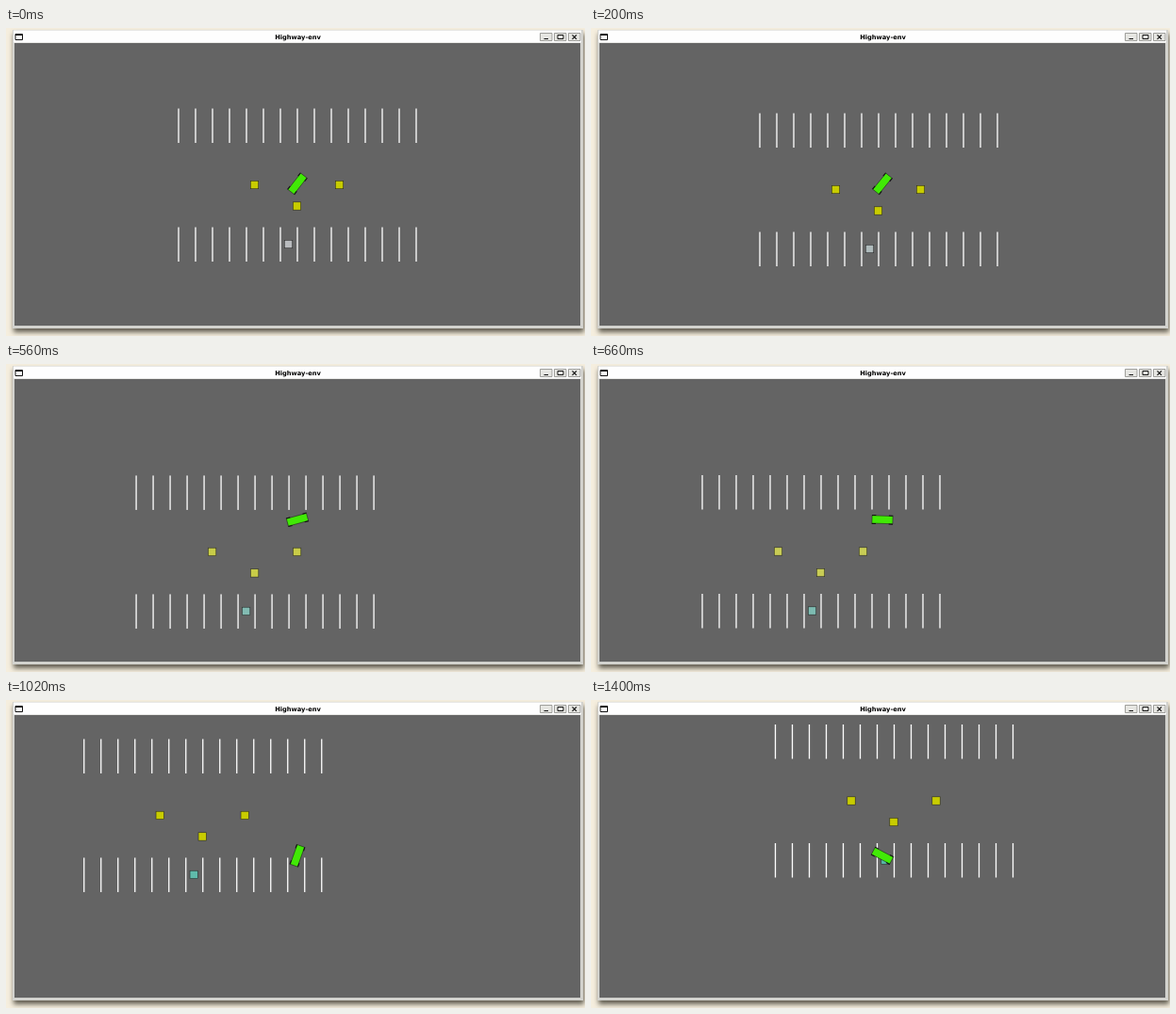
Animation of 614 by 327 pixels, one loop 1480 ms. Source, as an HTML page with a canvas:

```html
<!DOCTYPE html>
<html lang="en">
<head>
<meta charset="utf-8">
<title>Highway-env</title>
<style>
  html, body { margin: 0; width: 100%; height: 100%; overflow: hidden; background: #f5eede; }
  #window { position: absolute; left: 7px; top: 2px; width: 604.5px; height: 317px;
    background: #d2d2ce; box-shadow: 1px 4px 5px rgba(50, 45, 35, .75); }
  svg, canvas { position: absolute; left: 0; top: 0; }
  canvas { left: 9px; top: 16px; }
  text { font: bold 6.7px "DejaVu Sans", sans-serif; text-anchor: middle; }
</style>
</head>
<body>
<div id="window"></div>
<svg width="614" height="327">
  <rect x="8" y="2.5" width="602" height="13" fill="#fefefe"/>
  <path d="M10 6.5h7.5v6h-7.5z" fill="#fff" stroke="#111"/>
  <path d="M10 7.5h7.5" stroke="#111"/>
  <text x="309.5" y="11.6">Highway-env</text>
  <g fill="#e6e6e2" stroke="#8a8a86" stroke-width=".8">
    <path d="M566.5 5.5h12.5v8h-12.5zM581.5 5.5h12.5v8h-12.5zM596.5 5.5h12.5v8h-12.5z"/>
  </g>
  <g fill="none" stroke="#111">
    <path d="M570.5 11.5h4.5"/>
    <path d="M585 7.5h6v4h-6z"/>
    <path d="M600.5 7.3l4.5 4.5m0-4.5l-4.5 4.5" stroke-width="1.2"/>
  </g>
</svg>
<canvas id="scene" width="600" height="300"></canvas>
<script>
const ctx = document.getElementById('scene').getContext('2d');
const LOOP = 1480, SLOT = 18, RAD = Math.PI / 180;

// step, lot x, lot y, heading in degrees, speed, yellow tint, goal red
const keys = [
  [0, 183, 85.5, -52, 0.5, 0, 185],
  [2, 179, 90.5, -51, 6, 0, 175],
  [4, 168, 105, -50, 13, 45, 140],
  [7, 118, 118, 2, 20.5, 85, 125],
  [9, 83.5, 93.5, 49, 23, 0, 100],
  [13, 128.5, 7.5, 170, 34, 0, 90],
  [15, 195.5, 26, 208, 36, 0, 90]
];

const mix = (a, b, u) => a + (b - a) * u;

function hermite(a, b, da, db, u) {
  const s = u * u * (3 - 2 * u);
  return mix(a, b, s) + u * (1 - u) * (da * (1 - u) - db * u);
}

// The camera follows the car, so the lot drifts against the direction of travel.
function drift([step, , , heading, speed]) {
  const course = (heading + (step > 4 ? 8 : 0)) * RAD;
  return [-speed * Math.cos(course), -speed * Math.sin(course)];
}

function poseAt(step) {
  const i = Math.max(1, keys.findIndex(k => k[0] >= step));
  const a = keys[i - 1], b = keys[i], span = b[0] - a[0];
  const u = (step - a[0]) / span;
  const da = drift(a), db = drift(b);
  const along = n => hermite(a[n + 1], b[n + 1], da[n] * span, db[n] * span, u);
  return {
    x: along(0), y: along(1),
    heading: mix(a[3], b[3], u) * RAD,
    tint: mix(a[5], b[5], u), goalRed: mix(a[6], b[6], u)
  };
}

function box(x, y, w, h, color) {
  ctx.fillStyle = color;
  ctx.fillRect(x - w / 2, y - h / 2, w, h);
  ctx.strokeStyle = 'rgba(20,20,20,.8)';
  ctx.lineWidth = 0.6;
  ctx.strokeRect(x - w / 2, y - h / 2, w, h);
}

function drawLot({ x, y, tint, goalRed }) {
  ctx.save();
  ctx.translate(x, y);
  ctx.fillStyle = '#fff';
  for (let i = 0; i < 15; i++)
    for (const top of [0, 126]) ctx.fillRect(i * SLOT - 0.65, top, 1.3, 36.5);
  box(116.5, 144, 8.4, 8.4, `rgb(${goalRed},187,${mix(170, 190, (goalRed - 90) / 95)})`);
  for (const [bx, by] of [[80.5, 81], [170.5, 81], [125.5, 103.5]])
    box(bx, by, 8.4, 8.4, `rgb(200,204,${tint})`);
  ctx.restore();
}

function drawCar(heading) {
  ctx.save();
  ctx.translate(309, 165.3);
  ctx.rotate(heading);
  box(0, 0, 22, 8.2, '#41e906');
  ctx.fillStyle = '#111';
  for (const x of [-9, 9])
    for (const y of [-4.5, 4.5]) ctx.fillRect(x - 2.2, y - 0.5, 4.4, 1);
  ctx.restore();
}

function frame() {
  const tick = Math.floor(performance.now() % LOOP / 20);
  const pose = poseAt(Math.floor(tick * 13 / 60));
  ctx.setTransform(1, 0, 0, 1, 0, 0);
  ctx.fillStyle = '#646464';
  ctx.fillRect(0, 0, 600, 300);
  ctx.translate(-9, -16);
  drawLot(pose);
  drawCar(pose.heading);
  requestAnimationFrame(frame);
}
frame();
</script>
</body>
</html>
```
